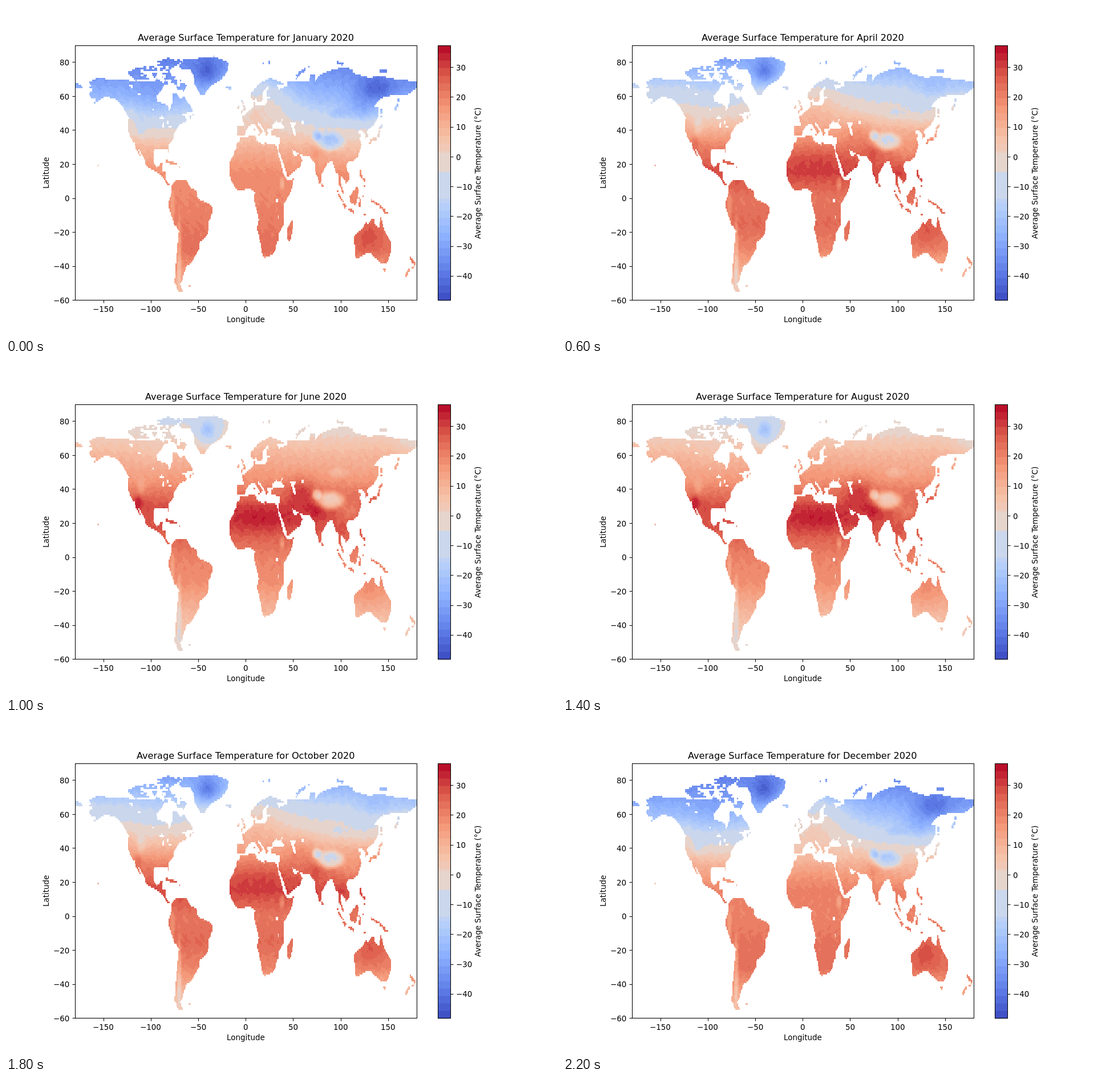
These frames come from a looping animation (966x580 px, 2.4 s). An HTML page with a canvas:

```html
<!DOCTYPE html>
<html lang="en">
<head>
<meta charset="utf-8">
<title>Average Surface Temperature</title>
<style>
html, body { margin: 0; width: 100%; height: 100%; overflow: hidden; background: #fff; }
canvas { display: block; }
</style>
</head>
<body>
<canvas id="stage" width="966" height="580"></canvas>
<script>
const W = 360, H = 150;
const plot = { x: 120.75, y: 69.6, w: 598.92, h: 446.6 };
const bar = { x: 757.1, w: 22.3 };
const T_MIN = -48.1, T_MAX = 37.4;
const months = ['January', 'February', 'March', 'April', 'May', 'June', 'July',
  'August', 'September', 'October', 'November', 'December'];

// Key points of the coastlines, in lon and lat.
const coasts = {
  canada: 'M-166 68.5 -156 71 -134 69.5 -128 70 -115 68.5 -95 68.5 -94 71 -87 68 -85 69.7 -82 69 -82 67 -86 66.5 -87.5 64.5 -94.5 60 -92.5 57 -82.5 55.2 -80 51.3 -79 54.5 -77 56 -77.5 62.3 -73 62 -69.5 58.8 -64.5 60.2 -62 57.5 -56 53 -56 51.5 -66 50 -69 48 -123 48 -130 54.5 -137 58.8 -148 60.3 -162 55 -157 58.5 -162 59 -165 61.5 -161 64.3 -166 65.5 -162 66.7Z',
  centralAmerica: 'M-123 48.5 -69 48.5 -65 49 -61 46 -70 43.7 -76 37 -76 35 -81 31.5 -80.5 25.3 -83 29.5 -94 29.5 -97 28 -97.5 22 -94 18.2 -91.5 18.7 -90.3 20.8 -87 21.4 -88.5 16 -84 15.7 -83.7 11 -82 9 -77.5 8.5 -83 8.2 -87.5 13 -94.5 16.2 -102 18 -105.5 20 -105.5 22.5 -112.5 29.5 -114.5 31.5 -109.8 23 -115 28 -117 32.5 -120.5 34.5 -124 40 -124 46Z',
  greenland: 'M-64 81.5 -50 82.5 -33 83.5 -18 80 -20 74 -26 70 -37 66 -42 62.5 -44 60.5 -48 61 -53.5 67 -55 73 -58 75.5 -67 76.3 -71 78Z',
  southAmerica: 'M-72 11.8 -71.5 10.5 -62 10.5 -57 6 -52 5 -50 0 -40 -2.8 -35.5 -5 -35 -8.5 -39 -13.5 -39 -18 -41 -22 -48.5 -26 -49 -29 -57 -38 -62 -39 -65.5 -45 -66 -48 -69 -50.5 -66 -55 -71 -55 -75 -49 -73.5 -44 -73.5 -38 -70.3 -18.5 -75 -15.5 -81 -5.5 -80.3 0 -77.5 4 -77.5 8.5Z',
  africa: 'M-5.5 35.8 10 37 11 34 20 31 20 32.7 32.5 31.2 33.5 28.5 37.3 20.5 39.5 15.3 44 10.7 51 11.8 48 5 39.5 -4.5 40.5 -15.5 35 -20 35.5 -24 32.7 -26 32 -29 28 -33 20 -34.7 18.3 -33.5 12 -17.5 13.7 -12 9 -1 9.7 4 4.3 6.3 -7.5 4.5 -12.5 7.5 -16.5 12.5 -17 21 -10 29.5 -9.5 32 -6.5 34ZM49.3 -12.3 50.3 -15.5 47 -25 44.3 -24.5 44.5 -16.5Z',
  europe: 'M-9 37 -9 43 -1.7 43.4 -4.5 48.3 1.5 50.5 8.5 54 8.3 57 10.5 57.3 10 54.4 20 54.5 24 59.3 30 60 22 60.5 21.5 63 25 65.5 22 65.7 17.5 62 18.5 60 16.5 57 12.5 56.5 11 59 8 58 5.5 59 5.5 62 14 67.5 26 71 41 67.5 33 66.7 35 64.3 44 66.5 44 68.5 62 69 62 43 40 43 38 44.5 39 47 36 45 33.5 44.5 32.5 46 28 43.5 28 41.3 23 40.7 24 38 22 36.7 19.5 40.5 13.8 45 12.5 44 18 40 16 38 12.5 41.5 8.5 44.3 3.5 43.3 -2 36.8Z',
  siberia: 'M60 69 67 69 68 72.5 73 73 73 68 76 72 87 75 104 77.5 113 75.5 113 73.7 131 71 140 72.5 160 70 180 69 180 65 170 61 156 61 143 59.3 135 54.5 140 53.5 140.5 48.5 135 43.5 128 40 60 40ZM-180 69 -172 66 -173 64.7 -180 65.5Z',
  southAsia: 'M60 41 129 41 127.5 39.5 129.3 36.5 126.5 35 126 38 121 40.7 118 39 122 37 119.5 35 121.8 31.5 118 24.5 113 22.3 108 21.5 105.8 19 109 14 109 11.5 105 8.7 105 10.5 100.5 13.5 99.5 11 104 1.5 98.5 8 98.5 13.5 94.3 16 91.5 22.5 87 21.3 80 15 80 11 78 8.2 73 17 72.7 21 67 25 60 25.2ZM80 9.5 81.7 7.5 80.5 6Z',
  middleEast: 'M61 44 61 25.2 51 28 48 30 51.5 24.5 56 26 59.7 22.5 57.5 19 45 13 43.3 13 42.5 16.5 35 28 36 36 27.5 37 27 40 31 41.3 41.5 41.5 40 44Z',
  australia: 'M114 -22 115.3 -34.3 118 -35 126 -32.5 131 -31.5 138 -35.5 144 -38.5 150 -37.3 153 -30.5 153.2 -25.5 146.3 -19 142.5 -10.8 140.8 -17.3 135.5 -15 136.7 -12.3 132.5 -11.5 129.5 -15 126 -14 122.3 -18ZM145 -41 148 -41 147 -43.4Z',
  borneo: 'M109.3 1.5 117 7 119 5 116 -4 110.5 -2.8Z'
};
const archipelago = 'M-125 74 -120 76 -104 73 -102 70 -116 69.5ZM-120 76.5 -105 78.5 -80 75.5 -80 74.5 -115 75ZM-100 74 -92 74 -96 71ZM-96 80 -83 82.5 -62 82.3 -78 76.5 -88 76.5ZM-89 73.5 -80 73.7 -67 69 -62 66.5 -65 63 -72 64 -73 67 -88 71Z';
// Narrow islands, drawn as lines.
const chains = 'M-84 22 -75 20.5 -69 19M-59 48 -55 49M-5 51 -1 53 -4 58M-9 53 -7 54M-21 65 -15 65M9 40V41M13 37.5H15M15 79H19M21 80H26M53 71 57 74 67 77M96 80 103 79M138 75H149M157 52 160 55 161 59M143 53V48M131 32 132 34 140 36 141 41 144 43.5M121 18V14L125 11V7M121 23V24.5M96 5 105 -5 114 -8M124 1 120 0V-5M132 -1 138 -3 146 -7 150 -10M139 -5 145 -6M124 -9.5 127 -9M173 -35 178 -38 175 -41M173 -41 168 -46M-156 20V19M-59 -51V-52';
const lakes = 'M-92 46.8 -88.5 48.8 -84.7 46.6ZM-87.8 42 -86.3 42 -85.2 45.8 -87.3 45ZM-83.5 46 -80 45.3 -82 43.2ZM-83 41.5 -76.3 44.2 -79 42ZM-99 53.8 -97.5 53.5 -96.7 50.5ZM-117 61 -110 62.8 -111 61.5ZM-124 66.5 -118 66.8 -120 65ZM47 45 53 45 51 42.5 53.8 37 50.5 37.3 49.5 40.5ZM58.5 45.5 61 46.3 60.5 44 58.5 44ZM31.7 .3 34 .3 33.5 -2.5 31.7 -2.5ZM34 -10 35 -10 35 -14Z';

// Yearly mean, summer swing and half-year swing, every 15 degrees from -60 to 90.
const zonal = {
  mean: [0, 8, 18, 22, 21, 26, 20, 5, -7, -19, -25],
  swing: [-4, -6, -8, -3, 0, 4, 11, 14, 18, 19, 17],
  half: [0, 0, -2, -3, -1.5, -4, -1, 0, 1, 4, 4]
};
// Regional climate: lon, lat, radii, change of mean and of swing.
const regions = [
  [12, 58, 38, 18, 10, -10], [138, 64, 22, 8, -7, 9], [175, 66, 15, 8, -4, 0],
  [122, 52, 18, 7, -5, 5], [58, 40, 16, 8, 6, 4], [15, 23, 45, 7, 4, 2.5],
  [74, 28, 8, 5, 5, 0], [110, 28, 12, 6, -5, -3], [-95, 60, 25, 12, -3, 1],
  [-113, 33, 5, 4, 5, 3], [-122, 45, 6, 8, 3, -4], [-40, 74, 13, 8, -16, -5],
  [-78, 82, 20, 4, -5, -3], [130, -22, 14, 8, 4, -2]];
// Cool plateaus with sharper edges: lon, lat, radii, change of mean.
const highlands = [
  [89, 33.5, 14, 5, -23], [75, 37, 5, 3, -18], [97, 50, 10, 3, -5], [38.5, 9, 2.5, 4, -7],
  [-70, -32, 2.4, 20, -9], [-77, -6, 2.5, 10, -5], [-110, 42, 5, 6, -5]];

const ctx = document.getElementById('stage').getContext('2d');
const grid = Object.assign(document.createElement('canvas'), { width: W, height: H });
const gctx = grid.getContext('2d', { willReadFrequently: true });

const random = (x, y) => {
  const v = Math.sin(x * 12.9898 + y * 78.233) * 43758.5453;
  return v - Math.floor(v);
};

function profile(values, lat) {
  const p = (lat + 60) / 15, k = Math.floor(p);
  return values[k] + (values[k + 1] - values[k]) * (p - k);
}

function climate(lon, lat) {
  const distance = (x, y, rx, ry) => ((lon - x) / rx) ** 2 + ((lat - y) / ry) ** 2;
  let mean = profile(zonal.mean, lat), swing = profile(zonal.swing, lat);
  for (const [x, y, rx, ry, warmer, wider] of regions) {
    const near = Math.exp(-distance(x, y, rx, ry));
    mean += warmer * near;
    swing += wider * near;
  }
  for (const [x, y, rx, ry, warmer] of highlands) {
    mean += warmer * Math.exp(-(distance(x, y, rx, ry) ** 2));
  }
  mean += Math.sin(lon * .55 + 2 * Math.sin(lat * .4)) * Math.cos(lat * .6 + lon * .13)
    + random(lon, lat) - .5;
  return { mean, swing, half: profile(zonal.half, lat) };
}

// Reads which cells are land from shapes drawn in degrees.
function landMask(draw) {
  gctx.clearRect(0, 0, W, H);
  gctx.setTransform(1, 0, 0, -1, 180, 90);
  gctx.lineWidth = 1.7;
  draw();
  gctx.resetTransform();
  const { data } = gctx.getImageData(0, 0, W, H);
  return i => data[i * 4 + 3] > 120;
}

const isMainland = landMask(() => {
  Object.values(coasts).forEach(path => gctx.fill(new Path2D(path)));
  gctx.globalCompositeOperation = 'destination-out';
  gctx.fill(new Path2D(lakes));
  gctx.globalCompositeOperation = 'source-over';
});
const isIsland = landMask(() => {
  gctx.fill(new Path2D(archipelago));
  gctx.stroke(new Path2D(chains));
});

const cells = [];
for (let i = 0; i < W * H; i++) {
  const col = i % W, row = Math.floor(i / W);
  const streak = random(Math.floor(col / 3), row);
  if (isMainland(i) || isIsland(i) && streak > .25) {
    cells.push({ i, ...climate(col - 179.5, 89.5 - row) });
  }
}

const stops = [[59, 76, 192], [98, 130, 234], [141, 176, 254], [184, 208, 249], [221, 221, 221],
  [245, 196, 173], [244, 154, 123], [222, 96, 77], [180, 4, 38]];
const BANDS = 34;
function color(temp) {
  let t = Math.min(.9999, Math.max(0, (temp - T_MIN) / (T_MAX - T_MIN)));
  if (t > .4 && t < .58) t = t < .505 ? .435 : .545;
  else t = (Math.floor(t * BANDS) + .5) / BANDS;
  const k = Math.floor(t * 8), f = t * 8 - k;
  return stops[k].map((c, n) => Math.round(c + (stops[k + 1][n] - c) * f));
}

function drawMap(month) {
  const angle = month / 12 * 2 * Math.PI;
  const summer = -Math.cos(angle), half = Math.cos(2 * angle);
  const image = gctx.createImageData(W, H);
  for (const c of cells) {
    image.data.set([...color(c.mean + c.swing * summer + c.half * half), 255], c.i * 4);
  }
  gctx.putImageData(image, 0, 0);
  ctx.imageSmoothingEnabled = false;
  ctx.drawImage(grid, plot.x, plot.y, plot.w, plot.h);
}

// Text starts on whole pixels; align is 0 for start, .5 for center, 1 for end.
function label(text, x, y, align, size = 13.42, angle = 0) {
  ctx.save();
  ctx.font = `${size}px "DejaVu Sans", sans-serif`;
  ctx.fillStyle = '#000';
  const shift = align * ctx.measureText(text).width;
  if (angle) ctx.translate(Math.round(x), Math.round(y + shift));
  else ctx.translate(Math.round(x - shift), Math.round(y));
  ctx.rotate(angle);
  ctx.fillText(text, 0, 0);
  ctx.restore();
}

const signed = n => String(n).replace('-', '\u2212');
const snapX = x => Math.round(x) + .5;
const snapY = y => Math.round(y) - .5;
const tick = (x, y, dx, dy) => {
  ctx.beginPath();
  ctx.moveTo(x, y);
  ctx.lineTo(x + dx, y + dy);
  ctx.stroke();
};
const box = (x, y, w, h) =>
  ctx.strokeRect(snapX(x), snapY(y), snapX(x + w) - snapX(x), snapY(y + h) - snapY(y));

function drawAxes() {
  const bottom = plot.y + plot.h, middle = plot.y + plot.h / 2;
  const right = bar.x + bar.w, scale = plot.h / (T_MAX - T_MIN);
  ctx.lineWidth = 1.07;
  ctx.strokeStyle = '#000';
  for (let lon = -150; lon <= 150; lon += 50) {
    const x = plot.x + (lon + 180) / 360 * plot.w;
    tick(snapX(x), snapY(bottom), 0, 5);
    label(signed(lon), x, 536, .5);
  }
  for (let lat = -60; lat <= 80; lat += 20) {
    const y = plot.y + (90 - lat) / 150 * plot.h;
    tick(snapX(plot.x), snapY(y), -5, 0);
    label(signed(lat), plot.x - 9.4, y + 4.6, 1);
  }
  for (let y = 0; y < plot.h; y++) {
    ctx.fillStyle = `rgb(${color(T_MAX - (y + .5) / scale)})`;
    ctx.fillRect(bar.x, plot.y + y, bar.w, Math.min(1.5, plot.h - y));
  }
  for (let temp = -40; temp <= 30; temp += 10) {
    const y = plot.y + (T_MAX - temp) * scale;
    tick(snapX(right), snapY(y), 5, 0);
    label(signed(temp), right + 9.4, y + 4.6, 0);
  }
  box(plot.x, plot.y, plot.w, plot.h);
  box(bar.x, plot.y, bar.w, plot.h);
  label('Longitude', plot.x + plot.w / 2, 554, .5);
  label('Latitude', 75, middle, .5, 13.42, -Math.PI / 2);
  label('Average Surface Temperature (°C)', 832, middle, .5, 13.42, -Math.PI / 2);
}

let shown = -1;
function frame() {
  const month = Math.floor(performance.now() / 200) % 12;
  if (month !== shown) {
    shown = month;
    ctx.fillStyle = '#fff';
    ctx.fillRect(0, 0, 966, 580);
    drawMap(month);
    drawAxes();
    label(`Average Surface Temperature for ${months[month]} 2020`,
      plot.x + plot.w / 2, 61, .5, 16.1);
  }
  requestAnimationFrame(frame);
}
frame();
</script>
</body>
</html>
```
